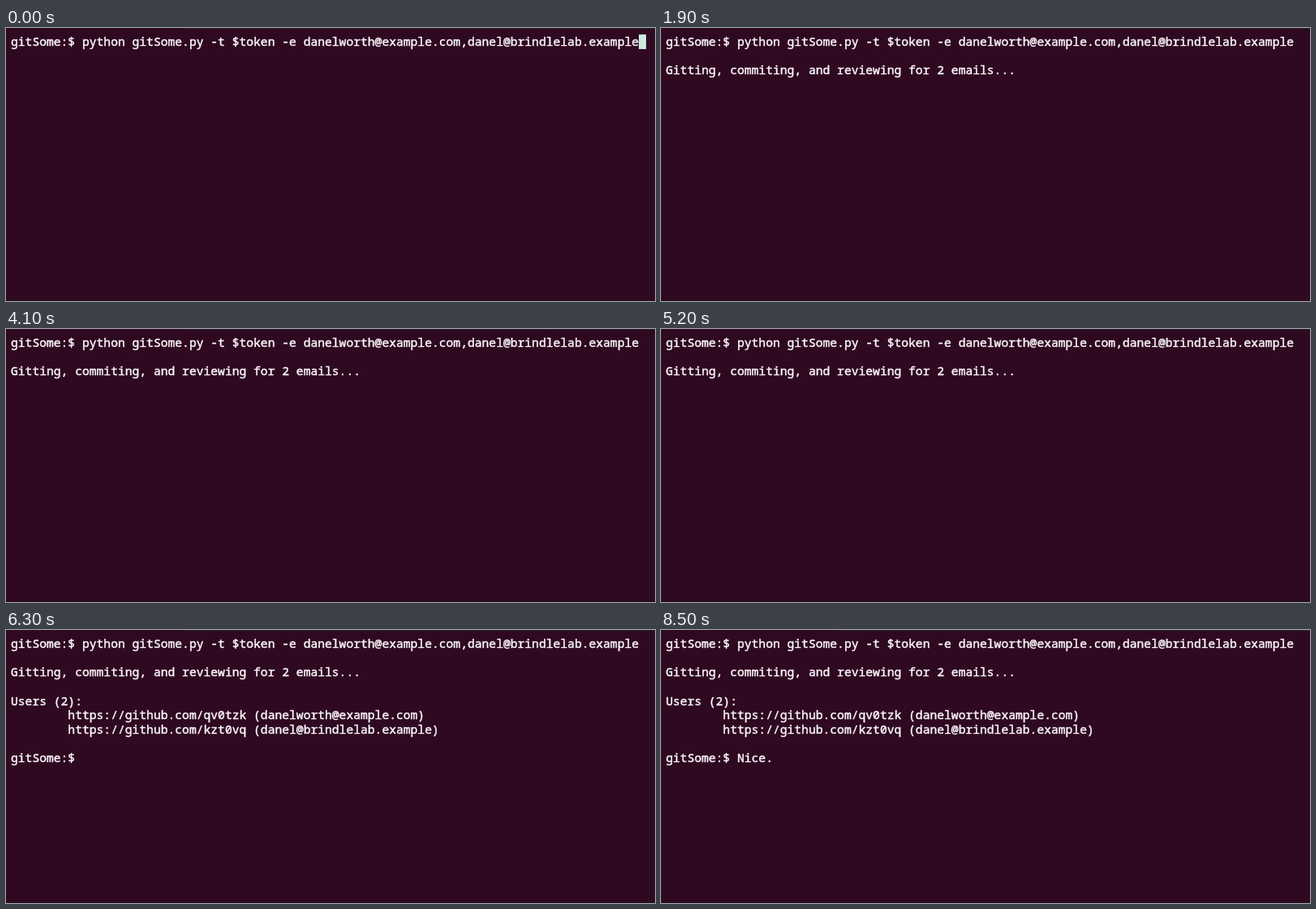
An HTML page with a canvas that plays this animation: 800x337 px, repeating every 8.7 s.

```html
<!DOCTYPE html>
<html lang="en">
<head>
<meta charset="utf-8">
<title>Terminal</title>
<style>
html, body { margin: 0; width: 100%; height: 100%; overflow: hidden; background: #2f0922; }
canvas { display: block; }
</style>
</head>
<body>
<canvas id="screen" width="800" height="337"></canvas>
<script>
const ctx = document.getElementById('screen').getContext('2d');
const LOOP = 8700, LEFT = 6, CELL = 8.796, LINE = 17.6;

const mails = ['danelworth@example.com', 'danel@brindlelab.example'];
const users = ['qv0tzk', 'kzt0vq'];
const prompt = 'gitSome:$ ';
const command = prompt + 'python gitSome.py -t $token -e ' + mails.join(',');

// [row, text, time it appears]
const output = [
  [0, command, 0],
  [2, 'Gitting, commiting, and reviewing for 2 emails...', 1800],
  [4, 'Users (2):', 5800],
  ...users.map((u, i) => [5 + i, ' '.repeat(8) + `https://github.com/${u} (${mails[i]})`, 5800]),
  [8, prompt, 5900]
];

const reply = 'Nice.';
const keyTimes = [7400, 7500, 7600, 7800, 7900];

// Cursor toggles, starting from visible
const blinks = [200, 800, 1300, 1800, 1900, 2400, 3000, 3500, 4100, 4600, 5200, 5800, 6300, 6900, 8300];

const countPast = (times, t) => times.filter(s => t >= s).length;

// One glyph per cell; the thin outline gives the semi-bold weight
function drawText(text, row, col = 0) {
  const y = Math.round(22.2 + row * LINE);
  [...text].forEach((ch, i) => {
    if (ch === ' ') return;
    const x = LEFT + (col + i) * CELL;
    ctx.fillText(ch, x, y);
    ctx.strokeText(ch, x, y);
  });
}

function cursorCell(t, typed) {
  if (t < 800) return [0, command.length];
  if (t < 1800) return [1, 0];
  if (t < 5800) return [3, 0];
  if (t < 5900) return [8, 0];
  return [8, prompt.length + typed];
}

function draw(t) {
  ctx.fillStyle = '#2f0922';
  ctx.fillRect(0, 0, 800, 337);
  ctx.fillStyle = '#26202c';
  ctx.fillRect(218, 0, 582, 1);
  ctx.fillStyle = '#1f0c1c';
  ctx.fillRect(0, 336, 800, 1);

  ctx.font = '500 14.66px "Noto Sans Mono", "DejaVu Sans Mono", monospace';
  ctx.fillStyle = ctx.strokeStyle = '#fbf8fa';
  ctx.lineWidth = 0.45;
  ctx.lineJoin = 'round';
  for (const [row, text, start] of output) {
    if (t >= start) drawText(text, row);
  }
  const typed = countPast(keyTimes, t);
  drawText(reply.slice(0, typed), 8, prompt.length);

  if (countPast(blinks, t) % 2 === 0) {
    const [row, col] = cursorCell(t, typed);
    ctx.fillStyle = '#cdebdc';
    ctx.fillRect(LEFT + col * CELL, Math.round(8.4 + row * LINE), 9, 18);
  }
}

const begin = performance.now();
function tick() {
  draw((performance.now() - begin) % LOOP);
  requestAnimationFrame(tick);
}
tick();
</script>
</body>
</html>
```
